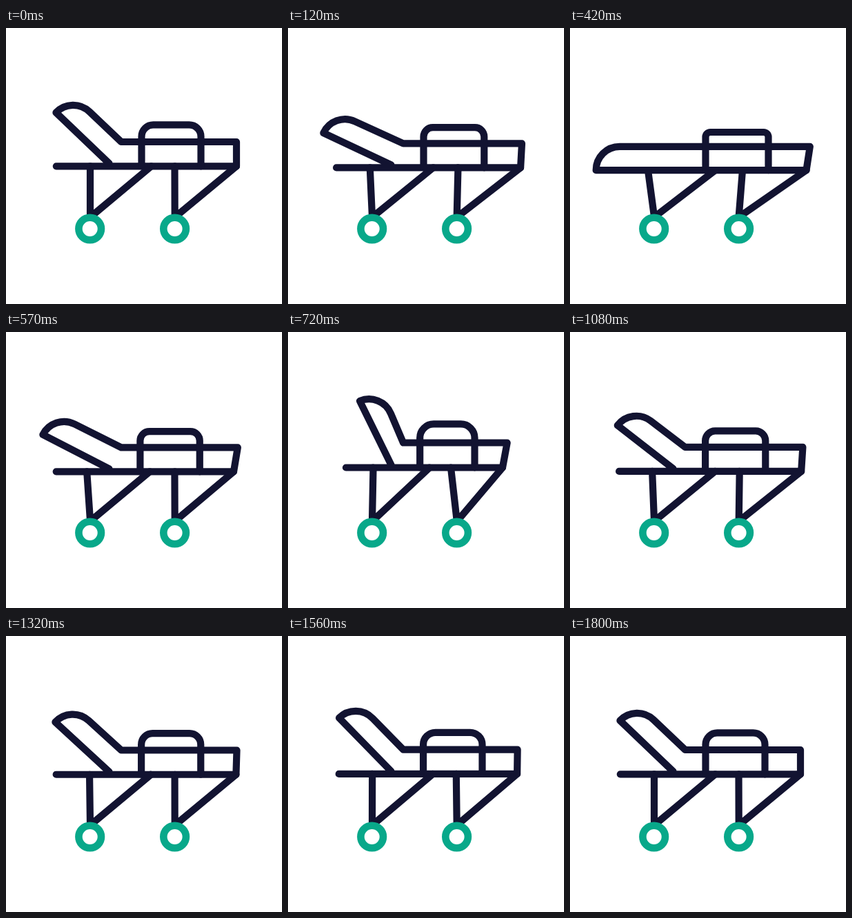
Recreate the animation shown at these times as an HTML page. Size 400x400 px, loop 3.83 s.

```html
<!DOCTYPE html>
<html lang="en">
<head>
<meta charset="utf-8">
<title>Stretcher</title>
<style>
  html, body { margin: 0; width: 100%; height: 100%; overflow: hidden; background: #fff; }
  svg { display: block; width: 100vw; height: 100vh; }
  path, circle { fill: none; stroke-width: 10.2; stroke-linecap: round; stroke-linejoin: round; }
  path { stroke: #121331; }
  circle { stroke: #08a88a; stroke-width: 10.6; }
</style>
</head>
<body>
<svg viewBox="0 0 400 400">
  <path id="frame"/>
  <path id="legs"/>
  <path id="rail"/>
  <circle cx="121.7" cy="291" r="16.3"/>
  <circle cx="244.6" cy="291" r="16.3"/>
</svg>
<script>
const LOOP = 3830, STEP = 30, MOTION_END = 1800;
const HINGE_X = 167, THICKNESS = 34.3, LEG_BOTTOM = 273;
const WHEELS = [122, 244.7];

// Swings alternate between stretching and squashing, each weaker than the last.
// The body, the turn of the back and its reach settle at their own rate.
const swings = [
  { at: 0, body: 0, turn: 0, reach: 0 },
  { at: 420, body: 1, turn: 1, reach: 1 },
  { at: 780, body: -1, turn: -1, reach: -1 },
  { at: 1140, body: 0.36, turn: 0.2, reach: 0.03 },
  { at: 1440, body: -0.1, turn: -0.1, reach: 0 },
  { at: MOTION_END, body: 0, turn: 0, reach: 0 }
];

const easeInOut = x => (1 - Math.cos(Math.PI * x)) / 2;
const easeOut = x => Math.sin(Math.PI * x / 2);
const kickOff = x => 0.7 * easeOut(x) + 0.3 * easeInOut(x);

// Returns a function that moves a value from rest by its stretch and squash offsets.
function rigAt(t, channel) {
  const next = Math.max(1, swings.findIndex(swing => swing.at >= t));
  const a = swings[next - 1], b = swings[next];
  const ease = next > 1 ? easeInOut : channel === 'body' ? kickOff : easeOut;
  const p = ease((t - a.at) / (b.at - a.at));
  const weight = sign => Math.max(0, sign * a[channel]) * (1 - p) + Math.max(0, sign * b[channel]) * p;
  return (rest, stretch, squash) => rest + stretch * weight(1) + squash * weight(-1);
}

const line = (...points) => 'M' + points.map(p => p.join(' ')).join('L');
const setPath = (id, d) => document.getElementById(id).setAttribute('d', d);

function draw(t) {
  const body = rigAt(t, 'body');

  const sink = body(0, 5.8, -4.5);
  const deckY = 200.3 + sink;
  const topY = 165 + 1.18 * sink;
  const railTop = 140.4 + 1.83 * sink;
  const radius = Math.min(20, 17 - 1.75 * sink);

  const deckL = body(72.8, -7.5, 12.5);
  const deckR = body(334, 8.5, -25.3);
  const topR = deckR + body(0, 5.3, 6.8);
  const railL = body(196.5, 0, -5.7);
  const railR = body(282.5, 5, -13.2);
  const legTops = [body(122, -9, 2.3), body(244.5, 5.5, -9.5)];
  const braceTops = [railL + 14, deckR];

  const angle = rigAt(t, 'turn')(43.5, -43.5, 28.3);
  const length = rigAt(t, 'reach')(63.5, 31.5, -21);
  const rad = angle * Math.PI / 180, cos = Math.cos(rad), sin = Math.sin(rad);
  const onBack = (u, v) => [HINGE_X + u * cos - v * sin, topY + u * sin + v * cos];
  const foot = [149.5, deckY - 4 * Math.min(1, angle / 20)];
  const tip = onBack(-length - THICKNESS, THICKNESS);
  const shoulder = onBack(-length, 0);

  setPath('frame',
    line(foot, tip) +
    `A${THICKNESS} ${THICKNESS} 0 0 1 ${shoulder.join(' ')}` +
    `L${HINGE_X} ${topY}L${topR} ${topY}L${deckR} ${deckY}` +
    line([deckL, deckY], [deckR, deckY]));

  setPath('legs', WHEELS.map((x, i) => line(
    [legTops[i], deckY], [x, LEG_BOTTOM], [x + 1.5, LEG_BOTTOM], [braceTops[i], deckY]
  )).join(''));

  const arc = `a${radius} ${radius} 0 0 1 ${radius} `;
  setPath('rail',
    `M${railL} ${deckY}V${railTop + radius}${arc}${-radius}` +
    `H${railR - radius}${arc}${radius}V${deckY}`);
}

const start = performance.now();
function tick() {
  const t = (performance.now() - start) % LOOP;
  draw(Math.min(Math.floor(t / STEP) * STEP, MOTION_END));
  requestAnimationFrame(tick);
}
tick();
</script>
</body>
</html>
```
